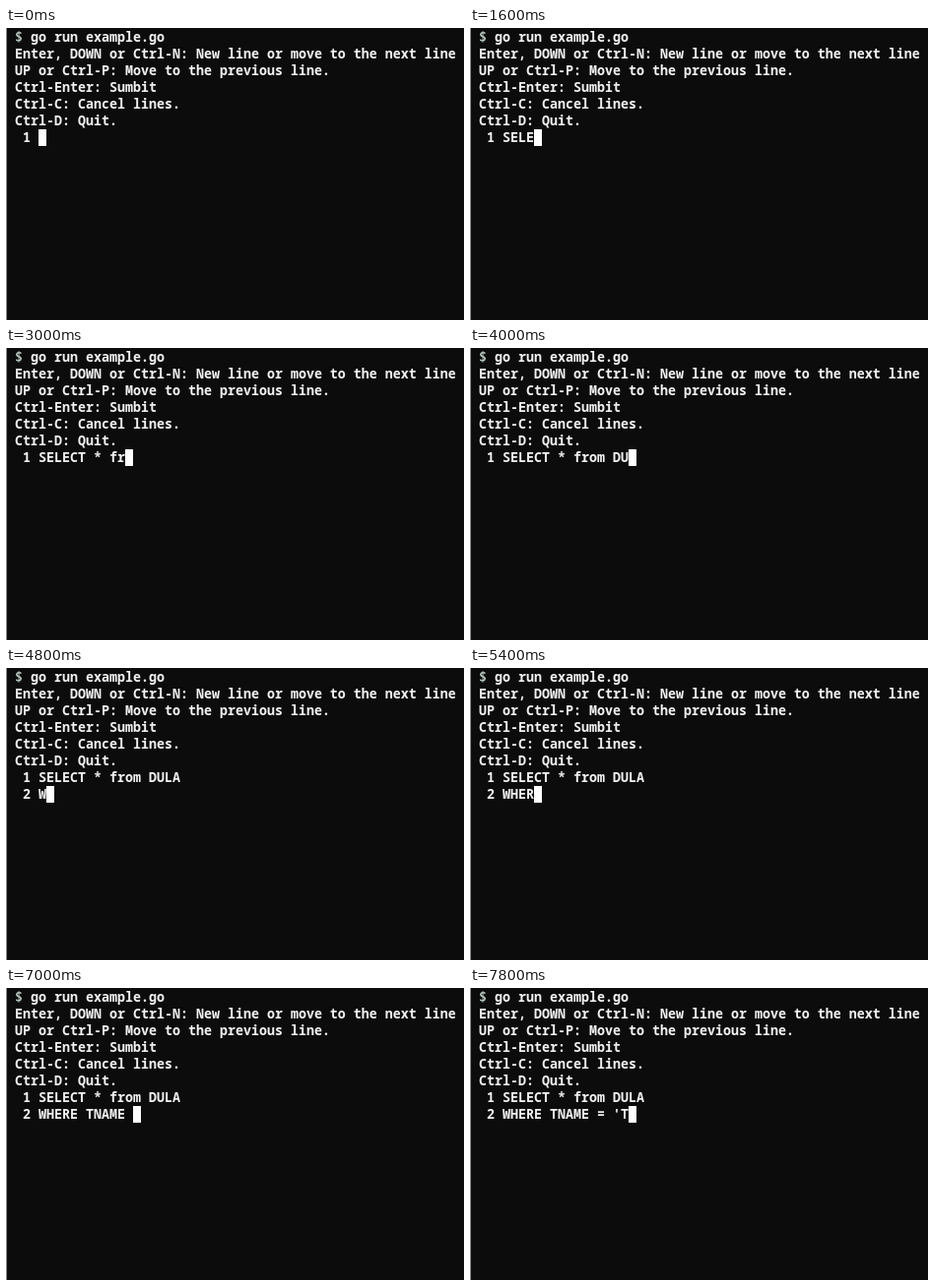
Animation of 465 by 297 pixels, one loop 8 s. Source, as an HTML page with a canvas:

```html
<!DOCTYPE html>
<html lang="en">
<head>
<meta charset="utf-8">
<title>Multi-line editor</title>
<style>
  html, body { margin: 0; width: 100%; height: 100%; overflow: hidden; background: #0c0c0c; }
  canvas { display: block; }
</style>
</head>
<body>
<canvas id="stage" width="465" height="297"></canvas>
<script>
const ctx = document.getElementById('stage').getContext('2d');
const LOOP = 8000, START = 1000, KEY_MS = 200;
const LEFT = 9, TOP = 1, CELL = 8, ROW = 17, BASELINE = 13;

const header = [
  '$ go run example.go',
  'Enter, DOWN or Ctrl-N: New line or move to the next line',
  'UP or Ctrl-P: Move to the previous line.',
  'Ctrl-Enter: Sumbit',
  'Ctrl-C: Cancel lines.',
  'Ctrl-D: Quit.'
];
const typed = "SELECT * from DULA\nWHERE TNAME = 'T";

function print(text, col, row, color = '#f2f2f2') {
  ctx.fillStyle = color;
  ctx.fillText(text, LEFT + col * CELL, TOP + row * ROW + BASELINE);
}

function draw(time) {
  ctx.fillStyle = '#0c0c0c';
  ctx.fillRect(0, 0, 465, 297);
  ctx.fillStyle = '#848989';
  ctx.fillRect(0, 0, 1, 297);

  // 13.333px gives the monospace font an advance of one 8px cell
  ctx.font = '600 13.333px "Noto Sans Mono", "DejaVu Sans Mono", monospace';
  print('$', 0, 0, '#b4c4b8');
  print(header[0].slice(1), 1, 0);
  header.slice(1).forEach((line, i) => print(line, 0, i + 1));

  const keys = time < START ? 0 : Math.floor((time - START) / KEY_MS) + 1;
  const lines = typed.slice(0, keys).split('\n');
  lines.forEach((line, i) => print(` ${i + 1} ${line}`, 0, header.length + i));

  const last = lines.length - 1;
  ctx.fillStyle = '#ffffff';
  ctx.fillRect(LEFT + (3 + lines[last].length) * CELL, TOP + (header.length + last) * ROW, CELL, ROW);
}

let origin;
function tick(now) {
  origin ??= now;
  draw((now - origin) % LOOP);
  requestAnimationFrame(tick);
}
draw(0);
requestAnimationFrame(tick);
</script>
</body>
</html>
```
